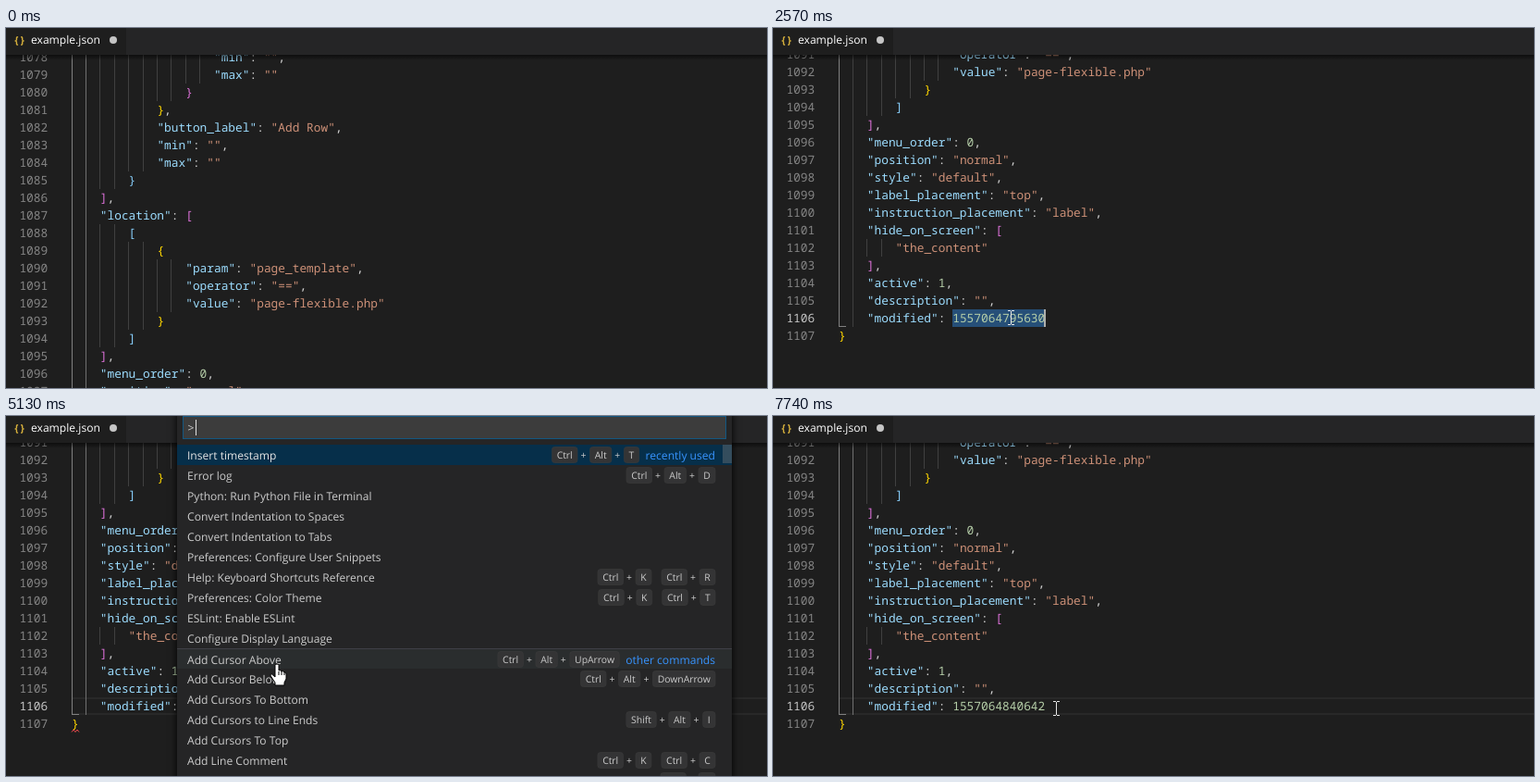
Write an HTML page with a canvas that moves like this. It is 823 px wide and 389 px high and loops after 8000 ms.

```html
<!DOCTYPE html>
<html>
<head>
<meta charset="utf-8">
<style>
html, body { margin: 0; width: 100%; height: 100%; overflow: hidden; background: #1e1e1e; }
canvas { display: block; }
</style>
</head>
<body>
<canvas width="823" height="389"></canvas>
<script>
const ctx = document.querySelector('canvas').getContext('2d');
ctx.textRendering = 'geometricPrecision';

const LOOP = 8000, CHAR = 7.7, LEFT = 71, LINE = 19, FIRST = 1078, ACTIVE = 1106;
const CODE = '12.83px "Noto Sans Mono", "DejaVu Sans Mono", monospace';
const UI = '12.1px "Open Sans", "Noto Sans", sans-serif';
const KEY = '10.4px "Open Sans", "Noto Sans", sans-serif';
const BRACKETS = ['#ffd700', '#da70d6', '#87cefa'];

// Each line: indent depth, then its text
const lines = `5"min": "",
5"max": ""
4}
3},
3"button_label": "Add Row",
3"min": "",
3"max": ""
2}
1],
1"location": [
2[
3{
4"param": "page_template",
4"operator": "==",
4"value": "page-flexible.php"
3}
2]
1],
1"menu_order": 0,
1"position": "normal",
1"style": "default",
1"label_placement": "top",
1"instruction_placement": "label",
1"hide_on_screen": [
2"the_content"
1],
1"active": 1,
1"description": "",
1"modified": 
0}`.split('\n').map(s => ({ depth: +s[0], text: s.slice(1) }));

// Label | key chord(s) | group name
const commands = `Insert timestamp|Ctrl+Alt+T|recently used
Error log|Ctrl+Alt+D
Python: Run Python File in Terminal
Convert Indentation to Spaces
Convert Indentation to Tabs
Preferences: Configure User Snippets
Help: Keyboard Shortcuts Reference|Ctrl+K Ctrl+R
Preferences: Color Theme|Ctrl+K Ctrl+T
ESLint: Enable ESLint
Configure Display Language
Add Cursor Above|Ctrl+Alt+UpArrow|other commands
Add Cursor Below|Ctrl+Alt+DownArrow
Add Cursors To Bottom
Add Cursors to Line Ends|Shift+Alt+I
Add Cursors To Top
Add Line Comment|Ctrl+K Ctrl+C
Add Selection To Next Find Match|Ctrl+D`.split('\n').map(s => s.split('|'));

// Pointer moves: start, end, steps, x, y
const moves = [
  [70, 220, 3, 508, 236], [460, 850, 6, 340, 258], [1170, 1330, 3, 317, 267],
  [1400, 1940, 8, 257, 304], [2030, 2090, 2, 257, 313], [5130, 5130, 1, 293, 268],
  [5200, 5840, 9, 266, 41], [6380, 7080, 10, 306, 316]
];
const scrollTimes = [540, 620, 700, 780, 1480];
// Editor caret: from, to, x
const carets = [
  [1840, 2330, 256], [2570, 3040, 294], [3350, 3890, 194],
  [6210, 6380, 194], [6380, 6720, 294], [7230, 7740, 294]
];
const within = (t, a, b) => t >= a && t < b;

function rect(color, x, y, w, h) {
  ctx.fillStyle = color;
  ctx.fillRect(x, y, w, h);
}

function text(str, x, y, color, font) {
  ctx.font = font;
  ctx.fillStyle = color;
  ctx.fillText(str, x, y);
}

function pointer(t) {
  let x = 763, y = 387;
  for (const [start, end, steps, toX, toY] of moves) {
    if (t < start) break;
    const part = Math.min(1, (t - start) / (end - start || 1));
    const k = (Math.floor(part * (steps - 1) + 1e-6) + 1) / steps;
    const ease = k * k * (3 - 2 * k);
    x += (toX - x) * ease;
    y += (toY - y) * ease;
  }
  return { x: Math.round(x), y: Math.round(y) };
}

function tokenColor(token, depth, isKey) {
  if (/[{}[\]]/.test(token) && token.length === 1) return BRACKETS[depth % 3];
  if (token[0] === '"') return isKey ? '#9cdcfe' : '#ce9178';
  return /\d/.test(token) ? '#b5cea8' : '#d4d4d4';
}

function drawEditor(t) {
  const scroll = 50 * scrollTimes.filter(s => t >= s).length;
  const top = n => 554 - scroll + LINE * (n - ACTIVE);
  const selected = within(t, 2570, 3350);
  const stamp = t < 3350 ? '1557064795630' : t >= 6380 ? '1557064840642' : '';

  ctx.save();
  ctx.beginPath();
  ctx.rect(0, 29, 823, 360);
  ctx.clip();

  const activeTop = top(ACTIVE);
  if (selected) rect('#264f78', 194, activeTop, 100, LINE);
  else {
    rect('#282828', LEFT, activeTop, 752, 2);
    rect('#282828', LEFT, activeTop + LINE - 2, 752, 2);
  }

  lines.forEach(({ depth, text: source }, i) => {
    const n = FIRST + i, y = top(n), indent = LEFT + depth * 4 * CHAR;
    if (y < 0 || y > 389) return;
    for (let k = 0; k < depth * 2; k++) {
      const color = k === 0 ? '#808080' : k === 1 && !selected ? '#707070' : '#404040';
      rect(color, Math.floor(LEFT + k * 2 * CHAR), y, 1, LINE);
    }
    text(n, 14.4, y + 14, n === ACTIVE ? '#c6c6c6' : '#858585', CODE);
    const str = n === ACTIVE ? source + stamp : source;
    for (const m of str.matchAll(/"[^"]*"|\d+|[{}[\]:,]/g)) {
      const isKey = str[m.index + m[0].length] === ':';
      text(m[0], indent + m.index * CHAR, y + 14, tokenColor(m[0], depth, isKey), CODE);
    }
  });
  rect('#808080', LEFT, activeTop + LINE - 1, 8, 1);

  if (within(t, 4190, 7000)) {
    ctx.strokeStyle = '#f14c4c';
    ctx.beginPath();
    for (let k = 0; k < 5; k++) ctx.lineTo(LEFT + k * 2, activeTop + (k % 2 ? 35 : 37.5));
    ctx.stroke();
  }
  for (const [a, b, x] of carets) {
    if (within(t, a, b)) rect('#aeafad', x - 1, activeTop, 2, LINE);
  }

  const shade = ctx.createLinearGradient(0, 29, 0, 35);
  shade.addColorStop(0, 'rgba(0,0,0,.55)');
  shade.addColorStop(1, 'rgba(0,0,0,0)');
  rect(shade, 0, 29, 823, 6);
  ctx.restore();
}

function drawTabs() {
  rect('#252526', 0, 0, 823, 29);
  rect('#1e1e1e', 0, 0, 130, 29);
  text('{}', 8, 16.5, '#d6b03c', 'bold 11px "Noto Sans Mono", monospace');
  text('example.json', 27, 17, '#ffffff', UI);
  ctx.fillStyle = '#c5c5c5';
  ctx.beginPath();
  ctx.arc(116, 13, 4, 0, 7);
  ctx.fill();
}

// Lays keys out from the right edge towards the left
function drawKeys(chords, right, y) {
  let x = right;
  chords.split(' ').reverse().forEach((chord, c) => {
    if (c) x -= 11;
    chord.split('+').reverse().forEach((key, i) => {
      if (i) {
        x -= 13.5;
        text('+', x + 3.5, y + 4, '#cccccc', KEY);
      }
      ctx.font = KEY;
      const w = ctx.measureText(key).width + 10.5;
      x -= w;
      ctx.beginPath();
      ctx.roundRect(x, y - 8.5, w, 17, 3);
      ctx.fillStyle = '#343435';
      ctx.fill();
      ctx.strokeStyle = 'rgba(60,60,60,.6)';
      ctx.stroke();
      text(key, x + 5.25, y + 3.5, '#cccccc', KEY);
    });
  });
}

function drawPalette(t, mouse) {
  ctx.save();
  ctx.shadowColor = '#000';
  ctx.shadowBlur = 8;
  ctx.shadowOffsetY = 5;
  rect('#252526', 185, -10, 600, 410);
  ctx.restore();

  const focused = t < 6070;
  rect(focused ? '#135781' : '#3c3c3c', 191, 0, 588, 25);
  rect('#3c3c3c', 192, 1, 586, 23);
  text('>', 196.5, 17, '#cccccc', UI);
  if (within(t, 4110, 4650) || within(t, 5130, 5640)) rect('#e0e0e0', 205, 4, 1, 17);

  const hover = t >= 5130 ? Math.floor((mouse.y - 31) / 22) : -1;
  commands.forEach(([label, keys, group], i) => {
    const y = 42 + 22 * i + (i === 10 ? 1 : 0);
    const rowTop = 31 + 22 * i;
    if (i === 0) rect('#062f4a', 185, rowTop, 600, 22);
    else if (i === hover) rect('#2a2d2e', 185, rowTop, 600, 22);
    if (i === 10) rect('#3f3f46', 185, rowTop, 600, 1);
    text(label, 196, y + 4.5, i ? '#cccccc' : '#e4e4e4', UI);
    let right = 767;
    if (group) {
      right -= ctx.measureText(group).width;
      text(group, right, y + 4.5, '#3794ff', UI);
      right -= 7;
    }
    if (keys) drawKeys(keys, right, y);
  });
  rect('#344d5d', 775, 31, 10, 20);
}

const hand = new Path2D('M-2 1.5Q-2 0 0 0T2 1.5V7Q4 6 5 8Q7 7 8 9Q10 8.5 10 11V16L8 20V23H-2V20L-6 14Q-8 11 -5.5 11L-2 14Z');

function drawPointer({ x, y }, isHand) {
  if (isHand) {
    ctx.save();
    ctx.translate(x, y);
    ctx.fillStyle = '#fff';
    ctx.fill(hand);
    ctx.strokeStyle = '#000';
    ctx.stroke(hand);
    for (const fx of [2, 5, 8]) rect('#000', fx - .5, 8, 1, 4);
    ctx.restore();
    return;
  }
  rect('#e6e6e6', x, y - 7, 1, 14);
  for (const sy of [y - 8, y + 7]) {
    rect('#e6e6e6', x - 3, sy, 3, 1);
    rect('#e6e6e6', x + 1, sy, 3, 1);
  }
}

function frame(now) {
  const t = now % LOOP, open = within(t, 4110, 6210), mouse = pointer(t);
  ctx.lineWidth = 1;
  rect('#1e1e1e', 0, 0, 823, 389);
  drawEditor(t);
  drawTabs();
  if (open) drawPalette(t, mouse);
  if (t >= 70) drawPointer(mouse, open);
  requestAnimationFrame(frame);
}
requestAnimationFrame(frame);
</script>
</body>
</html>
```
